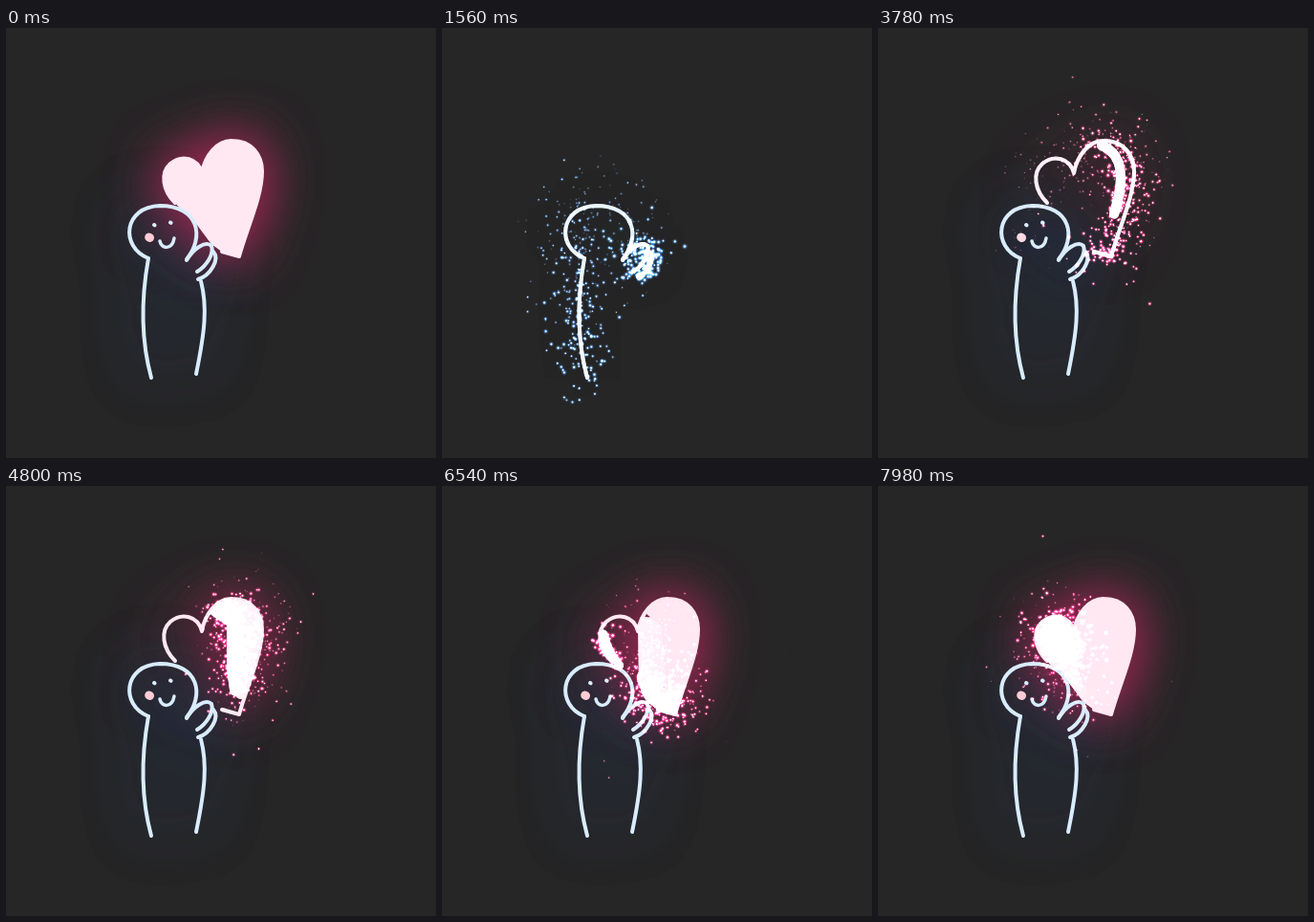
Animation, 450 px wide and 450 px high, one loop 8000 ms. Source, as an HTML page with a canvas:

```html
<!DOCTYPE html>
<html lang="en">
<head>
<meta charset="utf-8">
<title>Glowing heart</title>
<style>
  html, body { margin: 0; width: 100%; height: 100%; overflow: hidden; background: #262626; }
  canvas { display: block; width: 100vmin; height: 100vmin; }
</style>
</head>
<body>
<canvas id="stage" width="450" height="450"></canvas>
<script>
const SIZE = 450, LOOP = 8000, STEP = 60;
const BLUE = { line: '#d9ecff', glow: '#1e3c6e', spark: '80,160,255' };
const PINK = { line: '#ffe8f1', glow: '#962850', spark: '255,60,135' };

const HEART = 'M177,183 C164,170 161,152 172,142 C184,132 201,136 205,152 ' +
  'C208,134 221,117 237,118 C257,118 268,133 268,150 C268,176 253,207 244,239 L226,234';
const heartShape = new Path2D(HEART + ' L215,226 L200,206 L177,183 Z');

// Each stroke: palette, start ms, end ms, line width, path, clipped to the heart, own colour
const strokes = [
  [BLUE, 360, 880, 4, 'M189,242 C208,219 202,186 161,186 C123,187 119,229 149,241'],
  [BLUE, 880, 1180, 4, 'M149,241 C142,280 140,322 152,366'],
  [BLUE, 1220, 1430, 4, 'M189,243 C196,231 209,222 215,228 C218,236 210,249 200,255'],
  [BLUE, 1430, 1580, 4, 'M217,234 C224,242 214,259 201,263'],
  [BLUE, 1680, 2080, 4, 'M204,265 C211,292 208,318 199,362'],
  [BLUE, 2120, 2180, 4, 'M155,206 l.6,.4'],
  [BLUE, 2180, 2240, 4, 'M172,203.5 l.6,.4'],
  [BLUE, 2240, 2370, 3.5, 'M161,223 C163,232 174,232 176,220'],
  [PINK, 2370, 2430, 9, 'M149.7,219 l.8,.4', false, '#ffccd5'],
  [PINK, 2440, 3440, 4, HEART],
  [PINK, 3560, 3790, 10, 'M234,123 C257,132 259,158 246,198', true],
  [PINK, 3790, 4800, 14, 'M246,198 L260,150 L247,125 L259,132 L263,150 L246,216 L255,160 ' +
    'L244,130 L244,205 L238,126 L220,130 L238,142 L238,190 L241,213', true],
  [PINK, 4800, 6420, 16, 'M241,213 L230,138 L212,150 L226,205 L222,150 L213,145 L214,205 ' +
    'L240,232 L248,215 L232,225 L212,200 L222,228 L240,235 L216,213', true],
  [PINK, 6420, 6560, 9, 'M169,155 Q175,180 190,192', true],
  [PINK, 6560, 7980, 15, 'M190,192 L212,215 L180,180 L173,150 L198,195 L205,205 L178,145 ' +
    'L185,142 L203,185 L203,160 L190,142 L172,160 L195,180', true]
].map(([palette, start, end, width, d, clipped, color]) => {
  const node = document.createElementNS('http://www.w3.org/2000/svg', 'path');
  node.setAttribute('d', d);
  return { palette, start, end, width, clipped, node, color: color || palette.line,
           path: new Path2D(d), length: node.getTotalLength() };
});

const clamp = x => Math.max(0, Math.min(1, x));
const drawnLength = (s, t) => s.length * clamp((t - s.start) / (s.end - s.start));

function makeCanvas(size) {
  const canvas = document.createElement('canvas');
  canvas.width = canvas.height = size;
  return canvas.getContext('2d');
}

function seeded(seed) {
  return () => {
    seed = (seed * 1664525 + 1013904223) >>> 0;
    return seed / 4294967296;
  };
}

function makeSprite(rgb) {
  const g = makeCanvas(32);
  const fade = g.createRadialGradient(16, 16, 0, 16, 16, 16);
  fade.addColorStop(0, '#fff');
  fade.addColorStop(.18, '#fff');
  fade.addColorStop(.38, `rgba(${rgb},.75)`);
  fade.addColorStop(.6, `rgba(${rgb},.25)`);
  fade.addColorStop(1, `rgba(${rgb},0)`);
  g.fillStyle = fade;
  g.fillRect(0, 0, 32, 32);
  return g.canvas;
}

for (const palette of [BLUE, PINK]) {
  palette.sprite = makeSprite(palette.spark);
  palette.layer = makeCanvas(SIZE);
}

// Sparks burst from the pen tip at a steady rate, then slow down
const random = seeded(7);
const sparks = [];
for (const s of strokes) {
  for (let born = s.start; born < s.end; born += 1.5) {
    const tip = s.node.getPointAtLength(drawnLength(s, born));
    const angle = random() * Math.PI * 2;
    const reach = 4 + 52 * random() ** 1.5 + (random() < .05 ? 80 * random() : 0);
    sparks.push({
      born, sprite: s.palette.sprite,
      x: tip.x + (random() - .5) * s.width, y: tip.y + (random() - .5) * s.width,
      dx: Math.cos(angle) * reach, dy: Math.sin(angle) * reach,
      life: 600 + random() * 1000, size: 5 + random() * 3
    });
  }
}

function strokePart(g, s, from, to) {
  if (to <= from) return;
  g.setLineDash([to - from, 9999]);
  g.lineDashOffset = -from;
  g.stroke(s.path);
}

function drawStroke(s, t) {
  const g = s.palette.layer, reach = drawnLength(s, t);
  g.save();
  if (s.clipped) g.clip(heartShape);
  g.lineCap = g.lineJoin = 'round';
  g.lineWidth = s.width;
  g.strokeStyle = s.color;
  strokePart(g, s, 0, reach);
  // Fresh ink is white and cools down to its own tint
  g.strokeStyle = 'rgba(250,250,255,.3)';
  for (const age of [1400, 1000, 600, 300]) strokePart(g, s, drawnLength(s, t - age), reach);
  g.restore();
}

const ctx = document.getElementById('stage').getContext('2d');

function drawGlow(palette, alpha) {
  ctx.save();
  ctx.globalAlpha = alpha;
  ctx.shadowColor = palette.glow;
  ctx.shadowBlur = 56;
  ctx.shadowOffsetX = 1000;
  // Two passes give a fuller halo
  for (let pass = 0; pass < 2; pass++) ctx.drawImage(palette.layer.canvas, -1000, 0);
  ctx.restore();
}

function drawSparks(t) {
  ctx.globalCompositeOperation = 'lighter';
  for (const p of sparks) {
    const age = t - p.born;
    if (age < 0 || age > p.life) continue;
    const left = 1 - age / p.life, size = p.size * (.45 + .55 * left);
    const spread = 1 - Math.exp(-age / 350);
    ctx.globalAlpha = Math.min(1, left * 1.6);
    ctx.drawImage(p.sprite, p.x + p.dx * spread - size / 2,
                  p.y + p.dy * spread - size / 2, size, size);
  }
  ctx.globalAlpha = 1;
  ctx.globalCompositeOperation = 'source-over';
}

function render(time) {
  const t = Math.floor(time % LOOP / STEP) * STEP;
  const complete = t === 0, inkTime = complete ? 1e5 : t;

  for (const { layer } of [PINK, BLUE]) layer.clearRect(0, 0, SIZE, SIZE);
  strokes.forEach(s => drawStroke(s, inkTime));
  if (inkTime >= 7900) {
    PINK.layer.globalCompositeOperation = 'destination-over';
    PINK.layer.fillStyle = PINK.line;
    PINK.layer.fill(heartShape);
    PINK.layer.globalCompositeOperation = 'source-over';
  }

  ctx.fillStyle = '#262626';
  ctx.fillRect(0, 0, SIZE, SIZE);
  drawGlow(BLUE, clamp((inkTime - 1500) / 600));
  drawGlow(PINK, clamp((inkTime - 2700) / 2400));
  ctx.drawImage(PINK.layer.canvas, 0, 0);
  ctx.drawImage(BLUE.layer.canvas, 0, 0);
  if (!complete) drawSparks(t);
}

const began = performance.now();
function tick() {
  render(performance.now() - began);
  requestAnimationFrame(tick);
}
tick();
</script>
</body>
</html>
```
